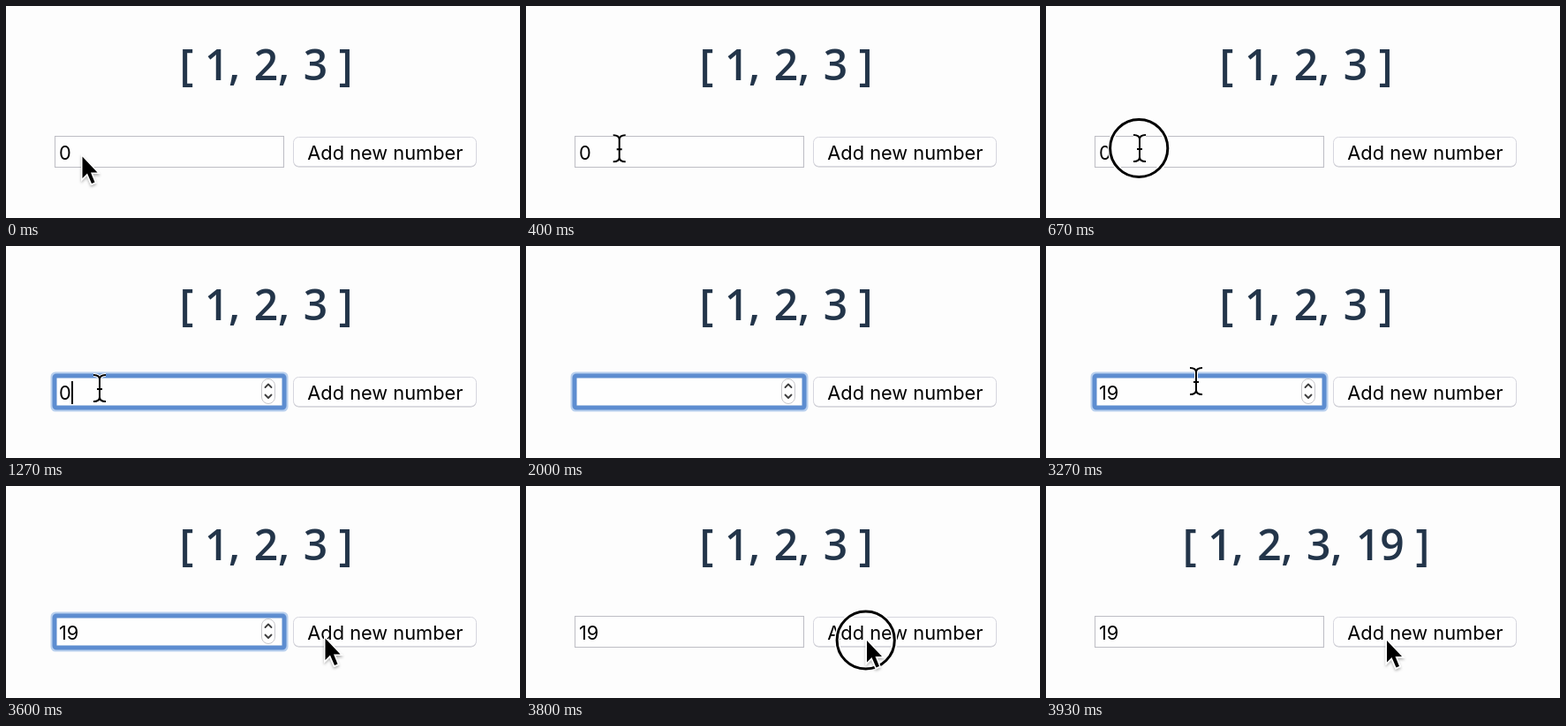
An HTML page that plays this animation: 582x240 px, repeating every 3990 ms.

```html
<!DOCTYPE html>
<html lang="en">
<head>
<meta charset="utf-8">
<title>Add new number</title>
<style>
  html, body { margin: 0; width: 100%; height: 100%; overflow: hidden; background: #fdfdfd; }
  svg { display: block; width: 582px; height: 240px; }
  .list { font: 600 48px "Open Sans", "Noto Sans", sans-serif; word-spacing: 3.2px; fill: #23354a; text-anchor: middle; }
  .ui { font: 400 21.8px Inter, Roboto, sans-serif; fill: #000; }
  .line { fill: none; stroke: #000; }
  .halo { fill: none; stroke: #fff; }
</style>
</head>
<body>
<svg viewBox="0 0 582 240">
  <defs>
    <filter id="soft" x="-50%" y="-50%" width="200%" height="200%">
      <feDropShadow dx="0" dy="2" stdDeviation="1.5" flood-color="#000" flood-opacity=".3"/>
    </filter>
    <path id="beamShape" d="M-7 -15 Q0 -15 0 -10 Q0 -15 7 -15 M0 -10 V10 M-7 15 Q0 15 0 10 Q0 15 7 15 M-3 1 H3"/>
  </defs>

  <text class="list" x="294.5" y="84">[<tspan id="numbers" dx="-3"></tspan><tspan dx="-3">]</tspan></text>

  <rect x="55.5" y="147.5" width="259" height="35" fill="#fefefe" stroke="#bdbdc4"/>
  <g id="focus">
    <rect x="52" y="144" width="266" height="42" rx="4" fill="none" stroke="#b9d0ee" stroke-width="3"/>
    <rect x="55" y="147" width="260" height="36" rx="2" fill="#fefefe" stroke="#5d8dd0" stroke-width="5"/>
    <rect x="289.5" y="150.5" width="15" height="28" rx="7.5" fill="#fefefe" stroke="#c8c8cc"/>
    <path d="M293.5 160 L297 156.5 L300.5 160 M293.5 168.5 L297 172 L300.5 168.5"
      fill="none" stroke="#3c3c3c" stroke-width="1.8" stroke-linecap="round" stroke-linejoin="round"/>
  </g>
  <text id="value" class="ui" x="60" y="174"></text>
  <rect id="caret" y="153" width="2" height="26" fill="#000"/>

  <rect x="325.5" y="149.5" width="207" height="33" rx="6" fill="#c4c4ca"/>
  <rect x="325.5" y="148.5" width="207" height="33" rx="6" fill="#fefefe" stroke="#d6d6de"/>
  <text class="ui" x="341.3" y="174">Add new number</text>

  <g id="pointer">
    <g id="ring">
      <circle cx="-.8" class="halo" stroke-width="6"/>
      <circle cx="-.8" class="line" stroke-width="3"/>
    </g>
    <g id="beam">
      <use href="#beamShape" class="halo" stroke-width="4"/>
      <use href="#beamShape" class="line" stroke-width="2"/>
    </g>
    <path id="arrow" d="M.5 .5 V25 L6 19.5 L11 31 L14.5 29.5 L10 18.5 H17.5 Z"
      fill="#000" stroke="#fff" stroke-width="3" paint-order="stroke" filter="url(#soft)"/>
  </g>
</svg>
<script>
const LOOP = 3990, STEP = LOOP / 60;
const $ = id => document.getElementById(id);
const show = (id, on) => $(id).setAttribute('display', on ? 'inline' : 'none');
const within = (t, from, to) => t >= from && t < to;
const ease = u => u * u * (3 - 2 * u);

// Pointer stops: time, x, y
const path = [
  [0, 86, 170], [430, 106, 161], [3100, 106, 161], [3260, 170, 153],
  [3591, 361, 172], [3720, 385.5, 174.5], [LOOP, 385.5, 174.5]
];
// Input states: time, text, caret x
const typing = [[0, '0', 74], [1680, '', 60], [2390, '1', 70], [2750, '19', 84]];
const caretOn = [[740, 1370], [1480, 1930], [2390, 3220]];
const clicks = [[590, 1180], [3720, 3860]];

function pointerAt(t) {
  const i = path.findIndex((p, n) => n && t < p[0]);
  const [a, b] = [path[i - 1], path[i]];
  const u = ease((t - a[0]) / (b[0] - a[0]));
  return [a[1] + (b[1] - a[1]) * u, a[2] + (b[2] - a[2]) * u];
}

function draw(t) {
  const [, text, caretX] = typing.filter(s => t >= s[0]).pop();
  $('numbers').textContent = t < 3855 ? ' 1, 2, 3 ' : ' 1, 2, 3, 19 ';
  $('value').textContent = text;
  $('caret').setAttribute('x', caretX);
  show('caret', caretOn.some(s => within(t, ...s)));
  show('focus', within(t, 720, 3780));

  const [x, y] = pointerAt(t);
  const overInput = within(t, 120, 3100) || (t >= 3100 && x < 315);
  $('pointer').setAttribute('transform', `translate(${x} ${y})`);
  show('pointer', !within(t, 1680, 3120));
  show('beam', overInput);
  show('arrow', !overInput);

  const click = clicks.find(c => within(t, ...c));
  show('ring', click);
  if (click) {
    const radius = 32.6 + 12 * Math.max(0, 1 - (t - click[0]) / 70);
    for (const circle of $('ring').children) circle.setAttribute('r', radius);
  }
}

function frame(now) {
  draw(Math.floor(now % LOOP / STEP) * STEP);
  requestAnimationFrame(frame);
}
draw(0);
requestAnimationFrame(frame);
</script>
</body>
</html>
```
